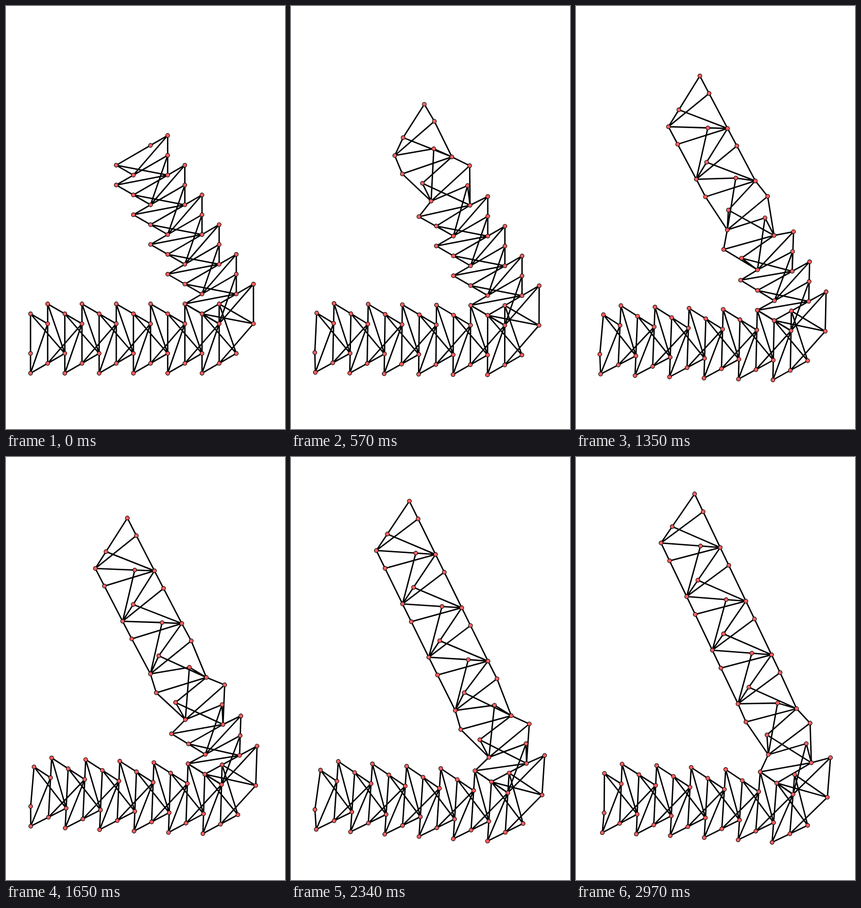
These frames come from a looping animation (567x859 px, 3 s). An HTML page with a canvas:

```html
<!DOCTYPE html>
<html lang="en">
<head>
<meta charset="utf-8">
<title>Folding linkage</title>
<style>
  html, body { margin: 0; width: 100%; height: 100%; overflow: hidden; background: #fff; }
  canvas { display: block; }
</style>
</head>
<body>
<canvas id="stage" width="567" height="859"></canvas>
<script>
const ctx = document.getElementById('stage').getContext('2d');
const LOOP = 3000, STEP = 30;
const U = 40.24, U2 = 2 * U, U7 = Math.sqrt(7) * U;   // the three bar lengths
const DX = 34.85, DY = 20.12;                         // lattice steps
const RAD = Math.PI / 180;
const MID = 95;                                       // hub distance at the fold front

// Pose after w seconds: the tip is pulled up, and the frame springs back near the end
function poseAt(w) {
  const kick = Math.exp(-w / 0.08), back = Math.max(0, w - 2.5) ** 2;
  return {
    front: -0.085 + 4.25 * w - 0.33 * w * w - 2.9 * kick - 3.8 * back,
    x: 433.2 + 2.6 * w ** 1.25 - 10 * back,
    y: 645.2 + 8.5 * w ** 1.72 - 70 * back,
    tilt: (0.5 * w ** 2.35 - 8 * back) * RAD,
    bend: (w * (2.5 - w) - 4.5 * back) * RAD,
    lean: (20.05 - 0.165 * w ** 2.5 + 1.02 * kick + 2.8 * back) * RAD,
    slip: -2.5 * (1 - Math.exp(-2.5 * w)) + 0.6 * w * w * Math.cos(2 * Math.PI * (w - 1.9))
  };
}

// Point at distance a from P and b from Q, on the given side of PQ
function meet(P, Q, a, b, side) {
  const x = Q[0] - P[0], y = Q[1] - P[1], d = Math.hypot(x, y);
  const along = (a * a - b * b + d * d) / (2 * d);
  const off = side * Math.sqrt(Math.max(0, a * a - along * along));
  return [P[0] + (x * along - y * off) / d, P[1] + (y * along + x * off) / d];
}

// Hubs h[j], h[j+1], h[j+2] are each tied to the joints p[j] and q[j]
function stepDown({ h, p, q }, j) {
  const s = j % 2 ? 1 : -1;
  p[j] = meet(h[j], h[j + 1], U, U7, s);
  q[j] = meet(h[j], h[j + 1], U2, U, -s);
  h[j + 2] = meet(p[j], q[j], U2, U7, s);
}
function stepUp({ h, p, q }, j) {
  const s = j % 2 ? 1 : -1;
  p[j] = meet(h[j + 1], h[j + 2], U7, U2, s);
  q[j] = meet(h[j + 1], h[j + 2], U, U7, s);
  h[j] = meet(p[j], q[j], U, U2, -s);
}

const seed = { h: { 1: [0, 0], 2: [MID, 0] }, p: {}, q: {} };
stepUp(seed, 0);
const WIDE = Math.hypot(...seed.h[0]);

// Applies f to every point of an arm
function mapArm(arm, f) {
  const out = {};
  for (const key in arm) {
    out[key] = {};
    for (const j in arm[key]) out[key][j] = f(arm[key][j]);
  }
  return out;
}

function rotate([x, y], angle) {
  const c = Math.cos(angle), s = Math.sin(angle);
  return [x * c - y * s, x * s + y * c];
}

// Upper arm with hub 11 at the origin and hub 12 on the x axis
function foldArm(front) {
  const m = Math.floor(front), arm = { h: {}, p: {}, q: {} };
  arm.h[m] = [0, 0];
  arm.h[m + 1] = [MID + (WIDE - MID) * (front - m), 0];
  for (let j = m; j <= 10; j++) stepDown(arm, j);
  for (let j = m - 1; j >= 0; j--) stepUp(arm, j);
  const [ox, oy] = arm.h[11], [ex, ey] = arm.h[12];
  const angle = -Math.atan2(ey - oy, ex - ox);
  return mapArm(arm, ([x, y]) => rotate([x - ox, y - oy], angle));
}

// Turns the arm by the corner tilt, bending it so that its tip has the given lean
function buildArm({ front, x, y, tilt, lean }) {
  const arm = foldArm(front), tip = arm.h[0];
  const extra = -Math.PI / 2 - lean - Math.atan2(tip[1], tip[0]) - tilt;
  const reach = Math.hypot(...tip);
  return mapArm(arm, point => {
    const [dx, dy] = rotate(point, tilt + extra * Math.hypot(...point) / reach);
    return [x + dx, y + dy];
  });
}

// Lower arm: a regular strip, slightly bent along its centre line
function buildBase({ x, y, tilt, bend, slip }) {
  const half = 1.5 * DY, curve = -bend / (10 * DX);
  const place = (i, row) => {
    const dx = (i - 11) * DX, dy = row * DY - half;
    const mid = tilt + curve * dx / 2, end = tilt + curve * dx;
    return [
      x - half * Math.sin(tilt) + dx * Math.cos(mid) - dy * Math.sin(end),
      y + half * Math.cos(tilt) + dx * Math.sin(mid) + dy * Math.cos(end)
    ];
  };
  const base = { h: {}, p: {}, q: {} };
  for (let i = 0; i < 14; i++) {
    const odd = i % 2;
    base.h[i] = place(i, odd ? 0 : 3);
    if (i > 11) continue;
    base.p[i] = place(i, odd ? -2 : 5);
    base.q[i] = place(i, odd ? 4 : -1);
  }
  base.h[0][0] += slip;   // the loose left joint
  return base;
}

function drawBars({ h, p, q }, count) {
  ctx.beginPath();
  for (let j = 0; j < count; j++)
    for (const joint of [p[j], q[j]])
      for (let k = 0; k < 3; k++) {
        ctx.moveTo(...joint);
        ctx.lineTo(...h[j + k]);
      }
  ctx.lineWidth = 2.8;
  ctx.stroke();
}

function drawJoints(points) {
  ctx.lineWidth = 1.2;
  for (const [x, y] of points) {
    ctx.beginPath();
    ctx.arc(x, y, 4, 0, 2 * Math.PI);
    ctx.fill();
    ctx.stroke();
  }
}

function draw(t) {
  const pose = poseAt(t / 1000);
  const base = buildBase(pose), arm = buildArm(pose);
  // joints shared at the corner
  arm.h[11] = base.h[11];
  arm.h[12] = base.h[13];
  arm.p[9] = base.p[9];
  arm.q[10] = base.q[10];

  ctx.fillStyle = '#fff';
  ctx.fillRect(0, 0, 567, 859);
  ctx.strokeStyle = '#000';
  ctx.lineCap = 'round';
  drawBars(base, 12);
  drawBars(arm, 11);

  const points = new Set();
  for (const part of [base, arm])
    for (const key in part)
      for (const j in part[key]) if (j >= 0) points.add(part[key][j]);
  ctx.fillStyle = '#ff6060';
  drawJoints(points);
}

const start = performance.now();
function tick() {
  const t = Math.max(0, performance.now() - start) % LOOP;
  draw(Math.floor(t / STEP) * STEP);
  requestAnimationFrame(tick);
}
tick();
</script>
</body>
</html>
```
